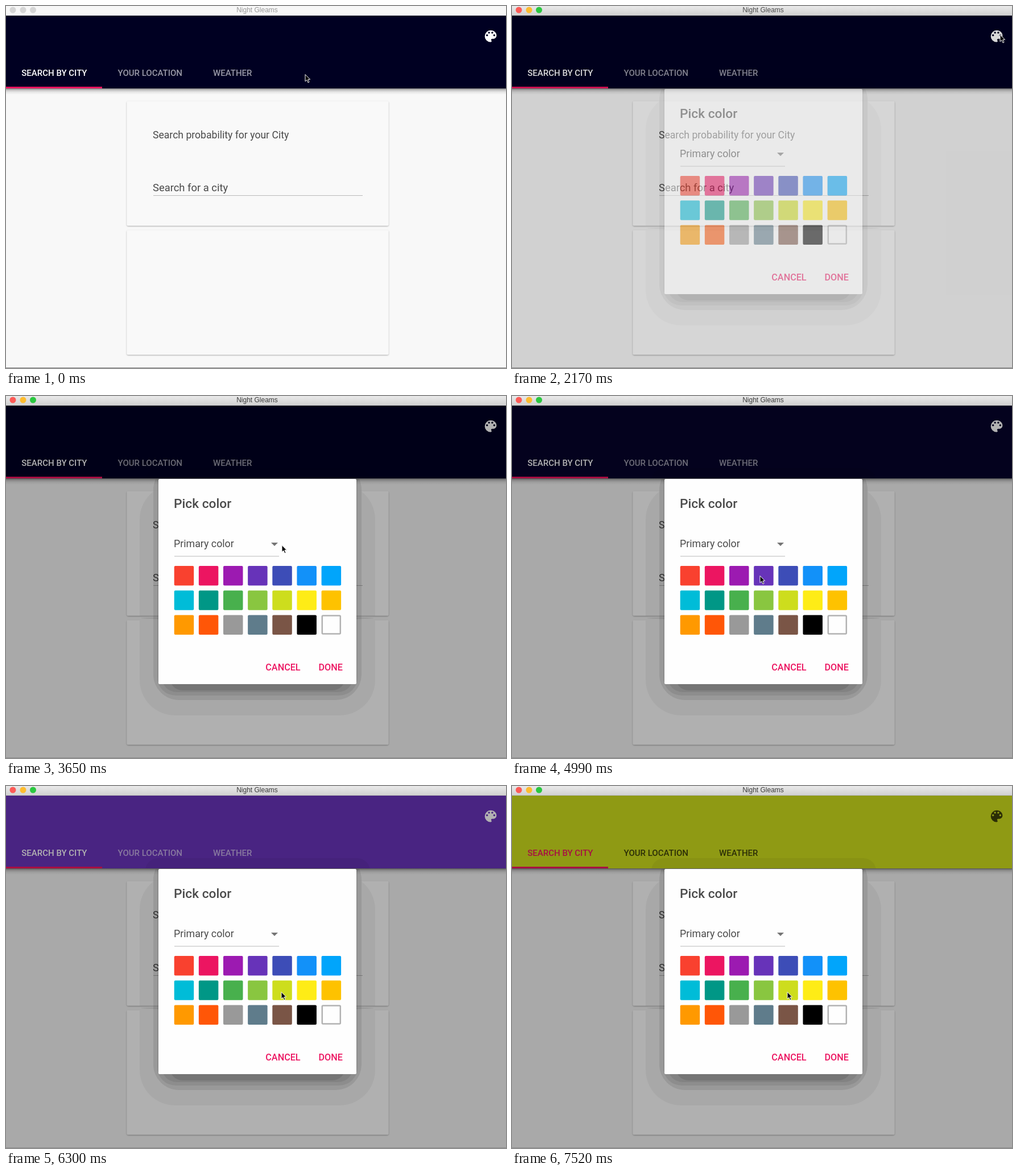
An HTML page for the animation above (7.99 s loop, 879x637 px).

```html
<!DOCTYPE html>
<html lang="en">
<head>
<meta charset="utf-8">
<title>Night Gleams</title>
<style>
  html, body { margin: 0; width: 100%; height: 100%; overflow: hidden; background: #f8f8f8; }
  svg { display: block; width: 100%; height: 100%; font-family: Roboto, sans-serif; }
  .caption { font: 12px "Liberation Sans", Arial, sans-serif; text-anchor: middle; }
  .tab { font-size: 15px; font-weight: 500; }
  .label { fill: #4a4a4a; }
  .action { font-size: 16.2px; font-weight: 500; fill: #ec1561; }
</style>
</head>
<body>
<svg viewBox="0 0 879 637" xmlns="http://www.w3.org/2000/svg">
  <defs>
    <linearGradient id="barFill" x2="0" y2="1">
      <stop offset="0" stop-color="#e9e9e9"/><stop offset="1" stop-color="#d1d1d1"/>
    </linearGradient>
    <linearGradient id="dropFill" x2="0" y2="1">
      <stop offset="0" stop-opacity=".5"/><stop offset=".25" stop-opacity=".22"/>
      <stop offset=".6" stop-opacity=".07"/><stop offset="1" stop-opacity="0"/>
    </linearGradient>
    <filter id="cardShadow" x="-5%" y="-5%" width="110%" height="112%">
      <feDropShadow dx="0" dy="1" stdDeviation="1.3" flood-opacity=".38"/>
    </filter>
    <clipPath id="inHeader"><rect y="17" width="879" height="128"/></clipPath>
    <clipPath id="inPage"><rect y="146" width="879" height="491"/></clipPath>
    <clipPath id="inCards">
      <rect x="213" y="168" width="460" height="219"/><rect x="213" y="395" width="460" height="219"/>
    </clipPath>
  </defs>

  <rect id="page" width="879" height="637"/>
  <g id="cards" filter="url(#cardShadow)">
    <rect x="212.5" y="167.5" width="460" height="219" rx="2"/>
    <rect x="212.5" y="394.5" width="460" height="219" rx="2"/>
  </g>
  <text class="label" x="258" y="233" font-size="17.6">Search probability for your City</text>
  <text class="label" x="258" y="326" font-size="18.4">Search for a city</text>
  <path d="M259 333.5H627" stroke="#b9b9b9"/>

  <rect y="145" width="879" height="11" fill="url(#dropFill)"/>
  <rect id="header" y="17" width="879" height="128"/>
  <rect y="142" width="169" height="3" fill="#f0145f"/>
  <text id="activeTab" class="tab" x="27.3" y="123">SEARCH BY CITY</text>
  <g id="otherTabs" class="tab">
    <text x="196.5" y="123">YOUR LOCATION</text><text x="364" y="123">WEATHER</text>
  </g>
  <path id="palette" transform="translate(838.2 39.4) scale(1.15)" d="M12 3a9 9 0 0 0 0 18c.83 0 1.5-.67 1.5-1.5 0-.39-.15-.74-.39-1.01-.23-.26-.38-.61-.38-.99 0-.83.67-1.5 1.5-1.5H16c2.76 0 5-2.24 5-5 0-4.42-4.03-8-9-8zM6.5 12a1.5 1.5 0 1 1 0-3a1.5 1.5 0 0 1 0 3zM9.5 8a1.5 1.5 0 1 1 0-3a1.5 1.5 0 0 1 0 3zM14.5 8a1.5 1.5 0 1 1 0-3a1.5 1.5 0 0 1 0 3zM17.5 12a1.5 1.5 0 1 1 0-3a1.5 1.5 0 0 1 0 3z"/>

  <rect id="backdrop" y="17" width="879" height="619"/>

  <g id="modal">
    <g clip-path="url(#inHeader)">
      <rect x="245" y="127" width="395" height="60" rx="22" fill-opacity=".05"/>
    </g>
    <g clip-path="url(#inCards)">
      <rect x="235" y="155" width="414" height="407" rx="62" fill-opacity=".045"/>
    </g>
    <ellipse cx="442" cy="391" rx="205" ry="2.5" fill-opacity=".1"/>
    <g id="rings" clip-path="url(#inPage)"></g>
    <rect x="268" y="146" width="348" height="361" rx="2" fill="#fefefe"/>
    <text class="label" x="295" y="197" font-size="22.7" font-weight="500">Pick color</text>
    <text class="label" x="295" y="266" font-size="17.8">Primary color</text>
    <path d="M466 258H478L472 264Z" fill="#757575"/>
    <path d="M296 282H480" stroke="#cfcfcf" stroke-width="1.5"/>
    <g id="swatches"></g>
    <path id="ripple" d="M427 299H454Q458 316 454 333.5H427Q425 333.5 425 331.5V301Q425 299 427 299Z" fill="#1b0050" fill-opacity=".16"/>
    <text class="action" x="456.3" y="483">CANCEL</text>
    <text class="action" x="549.5" y="483">DONE</text>
  </g>

  <rect id="bar" width="879" height="16"/>
  <rect id="barEdge" y="16" width="879" height="1"/>
  <g id="lights"></g>
  <text id="caption" class="caption" x="441.5" y="11">Night Gleams</text>
  <path d="M0 636.5H879" stroke="#8c8c8c"/>

  <path id="cursor" d="M1 1.5V13.6L3.8 11L6 15.8L8 14.9L5.9 10.2H9.6Z" fill="#000" stroke="#fff"/>
</svg>

<script>
const LOOP = 7990;
const $ = id => document.getElementById(id);
const set = (id, attrs) => {
  for (const key in attrs) $(id).setAttribute(key, attrs[key]);
};
const add = (parent, tag, attrs) => {
  const node = document.createElementNS("http://www.w3.org/2000/svg", tag);
  for (const key in attrs) node.setAttribute(key, attrs[key]);
  $(parent).append(node);
};

const NAVY = [0, 0, 34], VIOLET = [104, 51, 186], LIME = [205, 220, 29];
const WHITE = [255, 255, 255], PINK = [240, 20, 96];
const LIGHTS = ["#fc5b57", "#fdbc2f", "#2bc840"];
const SWATCHES = ("#f9412f #ec1561 #9c1ab1 #6733b9 #3d4db7 #1291f9 #01a5fb " +
  "#00bcd8 #009786 #48b04d #89c640 #cddd1d #feec16 #fec200 " +
  "#ff9900 #ff5607 #999999 #5f7c8b #7a5546 #000000").split(" ");

// Nested shadow bands: left edge, bottom edge, corner, opacity
for (const [x, bottom, rx, alpha] of
  [[259, 535, 45, .09], [266, 527, 32, .08], [274, 521, 26, .08], [288, 518, 22, .1]]) {
  add("rings", "rect", { x, y: 120, width: 884 - 2 * x, height: bottom - 120, rx, "fill-opacity": alpha });
}

const place = i => ({ x: 295.7 + 43.15 * (i % 7), y: 299 + 43.2 * Math.floor(i / 7) });
SWATCHES.forEach((fill, i) =>
  add("swatches", "rect", { ...place(i), width: 34.5, height: 34.5, rx: 2, fill }));
const last = place(20);
add("swatches", "rect", {
  x: last.x + 1.2, y: last.y + 1.2, width: 32, height: 32, rx: 1.5,
  fill: "#fefefe", stroke: "#b2b2b2", "stroke-width": 2.5
});
[12, 30, 47.5].forEach(cx => add("lights", "circle", { cx, cy: 7, r: 5.5 }));

// Cursor trips: first step, last step, number of steps, destination
const START = [525, 119];
const TRIPS = [
  [500, 1400, 6, [833, 54]],
  [1550, 1670, 2, [857, 49]],
  [2890, 3770, 7, [462, 273]],
  [3950, 4400, 4, [428, 305]],
  [4550, 4700, 2, [435, 315]],
  [6010, 6300, 3, [483, 361]]
];

const mix = (a, b, k) => a.map((v, i) => v + (b[i] - v) * k);
const rgb = c => `rgb(${c.map(Math.round)})`;
const ease = k => k * k * (3 - 2 * k);

// Latest value whose time has come
const held = (t, steps) => steps.reduce((value, [at, next]) => t >= at ? next : value, 0);

function cursorAt(t) {
  let from = START;
  for (const [begin, end, count, to] of TRIPS) {
    if (t < begin) return from;
    if (t < end) {
      const step = Math.floor((t - begin) / (end - begin) * (count - 1)) + 1;
      return mix(from, to, ease(step / count));
    }
    from = to;
  }
  return from;
}

function draw(t) {
  const focused = t >= 2010;
  const open = held(t, [[2170, .5], [2410, 1]]);
  const violet = held(t, [[4990, .06], [5140, .6], [5320, 1]]);
  const lime = held(t, [[7010, .34], [7130, .72], [7300, 1]]);

  set("page", { fill: rgb(mix([248, 248, 248], [242, 242, 242], open)) });
  set("cards", { fill: rgb(mix([249, 249, 249], [252, 252, 252], open)) });
  set("header", { fill: rgb(mix(mix(NAVY, VIOLET, violet), LIME, lime)) });
  set("activeTab", { fill: rgb(mix(WHITE, PINK, lime)) });
  set("otherTabs", { fill: rgb(mix(WHITE, [0, 0, 0], lime)), "fill-opacity": .6 + .1 * lime });
  set("palette", { fill: lime ? "#000" : "#fff", "fill-opacity": lime ? .7 : 1 });
  set("backdrop", { "fill-opacity": .3 * open });
  set("modal", { opacity: open });
  set("ripple", { opacity: t >= 5140 && t < 5500 ? 1 : 0 });

  set("bar", { fill: focused ? "url(#barFill)" : "#f7f7f7" });
  set("barEdge", { fill: focused ? "#b4b4b4" : "#dcdcdc" });
  set("caption", { fill: t >= 2890 ? "#3c3c3c" : focused ? "#4c4c4c" : "#999" });
  [...$("lights").children].forEach((dot, i) =>
    dot.setAttribute("fill", focused ? LIGHTS[i] : "#d5d5d5"));

  set("cursor", { transform: `translate(${cursorAt(t).map(Math.round)})` });
}

const begun = performance.now();
function tick() {
  draw((performance.now() - begun) % LOOP);
  requestAnimationFrame(tick);
}
tick();
</script>
</body>
</html>
```
